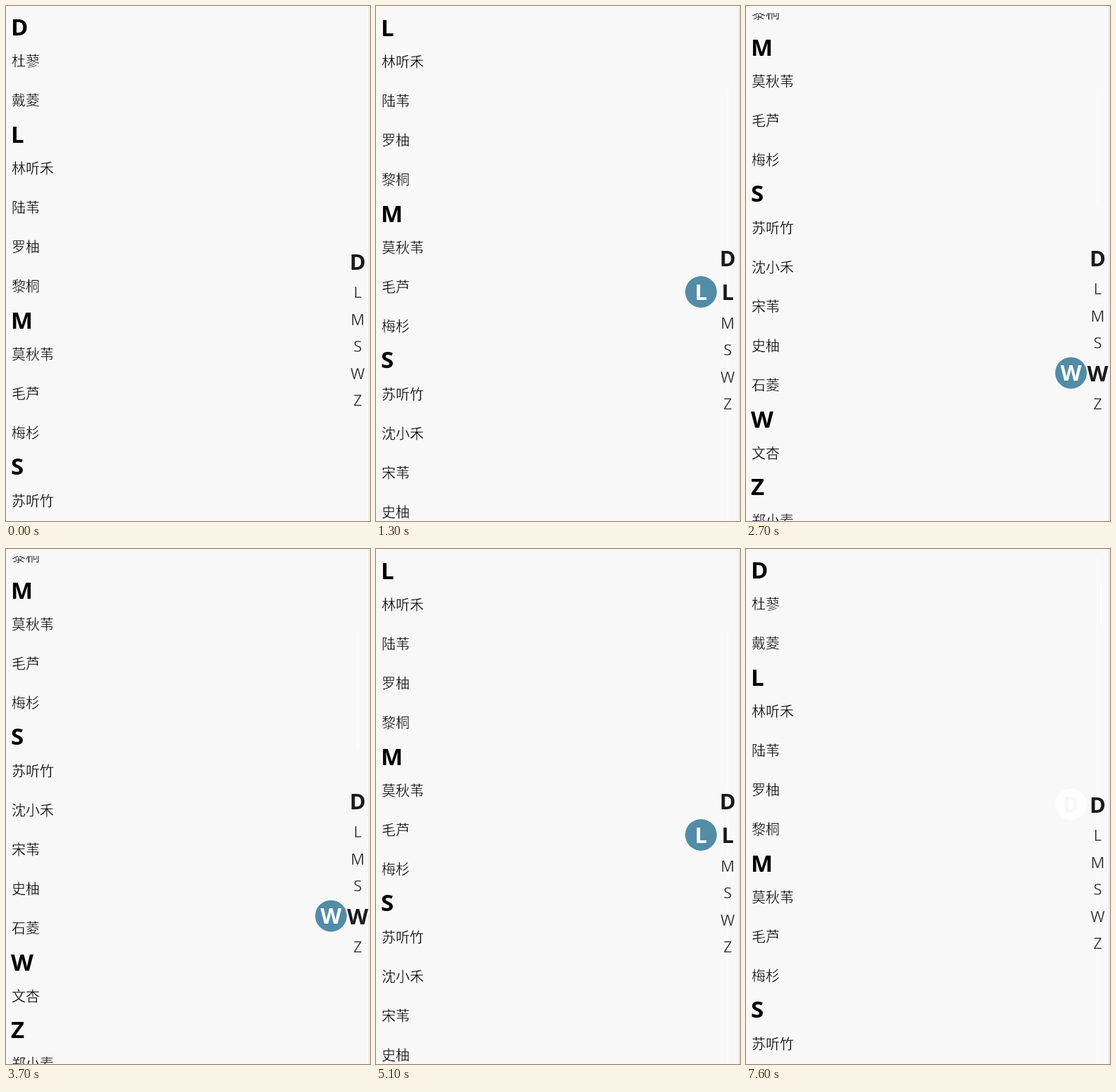
An HTML page that plays this animation: 518x734 px, repeating every 8000 ms.

```html
<!DOCTYPE html>
<html lang="zh-CN">
<head>
<meta charset="utf-8">
<style>
html, body { margin: 0; width: 100%; height: 100%; overflow: hidden; background: #f8f8f8; }
#stage { position: relative; width: 518px; height: 734px; overflow: hidden; font-family: "Open Sans", "Noto Sans", sans-serif; }
#stage div { position: absolute; }
#view { left: 0; top: 10px; width: 498px; height: 724px; overflow: hidden; }
#list { left: 0; top: -10px; }
#list div { white-space: nowrap; color: #000; }
.head { left: 7px; height: 40px; font-size: 33px; line-height: 40px; font-weight: 700; }
/* A thin stroke in the page colour slims the strokes of the regular weight. */
.name, .key:not(.on) { -webkit-text-stroke: .35px #f8f8f8; }
.name { left: 8px; height: 56px; font: 300 20px/56px "Noto Sans CJK SC", "Noto Sans CJK", sans-serif; }
.key { left: 470px; width: 61px; height: 40px; font-size: 22px; line-height: 40px; text-align: center; color: #1a1a1a; }
.key.on { font-size: 31px; font-weight: 700; }
#bubble { left: 440px; top: 0; width: 45px; height: 45px; border-radius: 50%; font-size: 31px; font-weight: 700; line-height: 44px; text-align: center; }
#trail, #thumb { left: 499px; width: 3px; }
#trail { background: #fbfbfb; }
#thumb { height: 642px; background: rgba(0, 0, 0, .22); border-radius: 2px; }
#mark { left: 503px; top: 50px; width: 3px; height: 56px; background: #fff; }
#edge { left: 516px; top: 0; width: 1px; height: 734px; background: #dedede; }
</style>
</head>
<body>
<div id="stage">
  <div id="view"><div id="list"></div></div>
  <div id="trail"></div><div id="thumb"></div><div id="mark"></div>
  <div id="keys"></div>
  <div id="bubble"></div>
  <div id="edge"></div>
</div>
<script>
const groups = {
  D: ['杜蓼', '戴菱'],
  L: ['林听禾', '陆苇', '罗柚', '黎桐'],
  M: ['莫秋苇', '毛芦', '梅杉'],
  S: ['苏听竹', '沈小禾', '宋苇', '史柚', '石菱'],
  W: ['文杏'],
  Z: ['郑小麦']
};
const letters = Object.keys(groups);
const LOOP = 8000, HEAD = 40.2, ROW = 56.2, MAX_SCROLL = 388.8;
const KEY = 38.5, KEY_ON = 48.5, KEY_MID = 461.2;

// [time, touched letter]
const touches = [[500, 'D'], [800, 'L'], [1600, 'M'], [2300, 'S'], [2700, 'W'], [3200, 'Z'],
  [3700, 'W'], [3900, 'S'], [4200, 'M'], [4600, 'L'], [5400, 'D'], [6400, '']];
// [time, scroll offset, delay before the bar fades]
const scrolls = [[800, 152, 300], [1600, MAX_SCROLL, 300], [4600, 152, 300], [5400, 0, 400]];
// [time, top, bottom] of the pale line the bar leaves behind
const trails = [[1300, 119, 734], [1600, 119, 285], [4600, 119, 734], [5400, 655, 734], [6400, 13, 734]];

const el = id => document.getElementById(id);
const last = (steps, t) => steps.filter(s => s[0] <= t).pop();
const show = (node, on) => { node.style.display = on ? '' : 'none'; };
const clamp = (v, max) => Math.min(max, Math.max(0, v));

function add(parent, cls, text, mid, height) {
  const div = document.createElement('div');
  div.className = cls;
  div.textContent = text;
  div.style.top = Math.round(mid - height / 2) + 'px';
  parent.append(div);
  return div;
}

let y = 10;
for (const letter of letters) {
  add(el('list'), 'head', letter, y + 20, 40);
  y += HEAD;
  for (const name of groups[letter]) {
    add(el('list'), 'name', name, y + 28, 56);
    y += ROW;
  }
}
const keys = letters.map(letter => add(el('keys'), 'key', letter, 0, 40));

// The first key always stays bold; returns the middle of the active key.
function layoutKeys(active) {
  const isOn = i => i === 0 || letters[i] === active;
  const sizes = letters.map((_, i) => isOn(i) ? KEY_ON : KEY);
  let top = KEY_MID - sizes.reduce((a, b) => a + b) / 2, found = 0;
  keys.forEach((key, i) => {
    const mid = top + sizes[i] / 2;
    key.className = isOn(i) ? 'key on' : 'key';
    key.style.top = Math.round(mid - 21) + 'px';
    if (letters[i] === active) found = mid;
    top += sizes[i];
  });
  return found;
}

function drawBubble(touch) {
  const bubble = el('bubble'), letter = touch ? touch[1] : '';
  const mid = layoutKeys(letter || 'D');
  show(bubble, touch);
  bubble.textContent = letter || 'D';
  bubble.style.transform = `translateY(${mid - 23.5}px)`;
  bubble.style.background = letter ? '#528ca6' : '#fefefe';
  bubble.style.color = letter ? '#fff' : '#f8f8f8';
}

function drawBar(t, scroll) {
  const thumb = el('thumb'), trail = el('trail');
  show(thumb, scroll && t < 6400);
  if (scroll) {
    const [start, offset, delay] = scroll;
    const faded = clamp(Math.floor((t - start - delay) / 100) + 1, 3);
    thumb.style.top = Math.round(13 + offset * .698) + 'px';
    thumb.style.opacity = offset ? 1 - faded / 3 : [1, .4, .1, .1][faded];
  }
  const line = last(trails, t);
  show(trail, line);
  if (line) {
    trail.style.top = line[1] + 'px';
    trail.style.height = line[2] - line[1] + 'px';
  }
}

function draw(t) {
  const scroll = last(scrolls, t);
  el('list').style.top = -10 - Math.round(scroll ? scroll[1] : 0) + 'px';
  drawBubble(last(touches, t));
  drawBar(t, scroll);
  el('mark').style.opacity = clamp(Math.floor((t - 7200) / 100) / 4, 1);
}

const begin = performance.now();
function tick() {
  draw((performance.now() - begin) % LOOP);
  requestAnimationFrame(tick);
}
tick();
</script>
</body>
</html>
```
